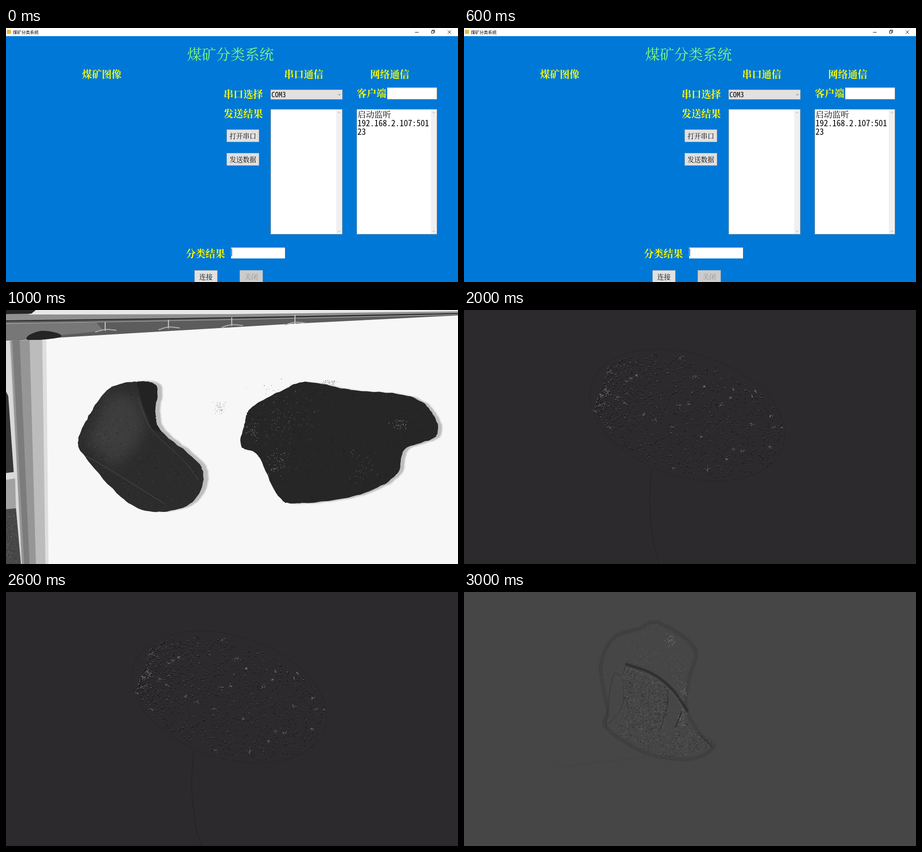
Recreate the animation shown at these times as an HTML page with a canvas. Size 998 px wide and 561 px high, loop 4 s.

```html
<!DOCTYPE html>
<html lang="zh">
<head>
<meta charset="utf-8">
<style>
html, body { margin: 0; width: 100%; height: 100%; overflow: hidden; background: #0078d7; }
canvas { display: block; width: 998px; height: 561px; }
</style>
</head>
<body>
<canvas id="stage" width="998" height="561"></canvas>
<script>
const W = 998, H = 561, HOLD = 1000;
const SERIF = '"Noto Serif CJK SC", "Noto Sans CJK SC", serif';
const SANS = '"Noto Sans CJK SC", sans-serif';
const MONO = '"Noto Sans Mono CJK SC", "Noto Sans CJK SC", monospace';
let g, rnd;

function seeded(seed) {
  return () => {
    seed = (seed + 0x6D2B79F5) | 0;
    let t = Math.imul(seed ^ (seed >>> 15), 1 | seed);
    t = (t + Math.imul(t ^ (t >>> 7), 61 | t)) ^ t;
    return ((t ^ (t >>> 14)) >>> 0) / 4294967296;
  };
}

const grey = (v, a = 1) => `rgba(${v},${v},${v},${a})`;
const between = (lo, hi) => lo + (hi - lo) * rnd();
const bell = () => rnd() + rnd() + rnd() - 1.5;

function rect(x, y, w, h, fill, edge) {
  g.fillStyle = fill;
  g.fillRect(x, y, w, h);
  if (edge) {
    g.strokeStyle = edge;
    g.lineWidth = 1;
    g.strokeRect(x + 0.5, y + 0.5, w - 1, h - 1);
  }
}

function text(s, x, y, size, color, family = SERIF, weight = 400) {
  g.font = `${weight} ${size}px ${family}`;
  g.fillStyle = color;
  g.textBaseline = 'middle';
  g.fillText(s, x, y);
}

function poly(p, color) {
  g.fillStyle = color;
  g.beginPath();
  for (let i = 0; i < p.length; i += 2) g.lineTo(p[i], p[i + 1]);
  g.fill();
}

// Catmull-Rom curve through a few x,y pairs; rough makes the edge ragged.
function curve(p, closed = true, rough = 0) {
  const path = new Path2D(), n = p.length / 2;
  const at = (i, k) => p[2 * (closed ? (i + n) % n : Math.min(n - 1, Math.max(0, i))) + k];
  const spline = (i, k, t) => {
    const [a, b, c, d] = [-1, 0, 1, 2].map(o => at(i + o, k));
    return b + t / 2 * (c - a + t * (2 * a - 5 * b + 4 * c - d + t * (3 * (b - c) + d - a)));
  };
  for (let i = 0; i < (closed ? n : n - 1); i++)
    for (let t = 0; t < 1; t += 0.1)
      path.lineTo(spline(i, 0, t) + between(-rough, rough), spline(i, 1, t) + between(-rough, rough));
  if (closed) path.closePath();
  else path.lineTo(at(n - 1, 0), at(n - 1, 1));
  return path;
}

function stroke(path, color, width = 1) {
  g.strokeStyle = color;
  g.lineWidth = width;
  g.stroke(path);
}

const line = (p, color, width = 1) => stroke(curve(p, false), color, width);

function blurred(px, draw) {
  g.save();
  g.filter = `blur(${px}px)`;
  draw();
  g.restore();
}

function inside(path, draw) {
  g.save();
  g.clip(path);
  draw();
  g.restore();
}

function dot(x, y, color, size) {
  g.fillStyle = color;
  g.fillRect(x, y, size * between(0.6, 1.2), size * between(0.6, 1.2));
}

function grain(n, x, y, w, h, lo, hi, alpha, size = 2) {
  for (let i = 0; i < n; i++)
    dot(x + rnd() * w, y + rnd() * h, grey(between(lo, hi), alpha), size);
}

function cluster(n, x, y, rx, ry, lo, hi, alpha, size = 1.6) {
  for (let i = 0; i < n; i++)
    dot(x + bell() * rx, y + bell() * ry, grey(between(lo, hi), alpha), size);
}

function chevron(x, y, dir, color = '#9a9a9a') {
  line([x - 2.5, y - dir * 1.3, x, y + dir * 1.3, x + 2.5, y - dir * 1.3], color);
}

function button(s, x, y, w, off) {
  rect(x, y, w, 28, off ? '#ccc' : '#e1e1e1', off ? '#bfbfbf' : '#adadad');
  text(s, x + (w - s.length * 14.7) / 2, y + 14, 14.7, off ? '#8f8f8f' : '#000');
}

function listBox(x, w) {
  rect(x, 179, w, 277, '#fff', '#8a8f96');
  rect(x + w - 14, 180, 13, 275, '#f0f0f0');
  chevron(x + w - 7.5, 187, -1);
  chevron(x + w - 7.5, 449, 1);
}

function titleBar() {
  rect(0, 0, W, 18, '#fff');
  rect(2, 4, 9, 9, '#e8b83a');
  text('煤矿分类系统', 15, 9.5, 9.5, '#000', SANS);
  rect(903, 9, 8, 1, '#111');
  rect(941, 4, 6, 6, '#fff', '#111');
  rect(939, 6, 6, 6, '#fff', '#111');
  line([975, 5, 983, 13], '#111');
  line([983, 5, 975, 13], '#111');
}

function form() {
  rect(0, 0, W, H, '#0078d7');
  titleBar();
  text('煤矿分类系统', 400, 58, 31.9, '#80ff80');
  const label = (s, x, y) => text(s, x, y, 21.7, '#ffff00', SERIF, 700);
  label('煤矿图像', 168, 101.5);
  label('串口通信', 614, 101.5);
  label('网络通信', 804, 101.5);
  label('串口选择', 480.5, 146);
  label('发送结果', 480.5, 189);
  label('客户端', 774.5, 143.5);
  label('分类结果', 397, 497.5);

  rect(584, 136, 159, 22, '#e1e1e1', '#adadad');
  text('COM3', 586, 147, 16, '#000', MONO);
  chevron(736, 147, 1, '#444');
  rect(841, 131, 111, 27, '#fff', '#8a8f96');
  listBox(584, 159);
  listBox(774, 178);
  ['启动监听', '192.168.2.107:501', '23'].forEach((s, i) =>
    text(s, 776, 190.5 + i * 19.3, 18.6, '#000', i ? MONO : SERIF));

  button('打开串口', 487, 224, 72);
  button('发送数据', 487, 276, 72);
  rect(496, 484, 121, 26, '#fff', '#0078d7');
  rect(498, 487, 1, 17, '#000');
  button('连接', 416, 535, 51);
  button('关闭', 516, 535, 51, true);
}

function rail() {
  poly([0, 0, W, 0, W, 12, 640, 30, 300, 50, 0, 68], '#5c5c5c');
  poly([0, 0, W, 0, W, 7, 500, 16, 0, 25], '#909090');
  poly([62, 0, W, 0, W, 3, 500, 9, 50, 10], '#e8e8e8');
  poly([0, 0, 66, 0, 56, 8, 0, 9], '#252525');
  poly([0, 28, 200, 28, 215, 46, 0, 68], '#777');
  line([0, 24, 500, 17, W, 8], '#252525', 2);
  line([0, 30, 500, 21, W, 10], '#a0a0a0', 1.5);
  for (let i = 0; i < 4; i++) {
    const x = 219 + i * 139.7, y = 36 - i * 5.3;
    line([x, y - 9, x, y + 10], '#d0d0d0', 2);
    line([x - 22, y + 13, x, y + 7, x + 25, y + 9], '#b4b4b4', 2);
  }
  g.fillStyle = '#242424';
  g.fill(curve([50, 56, 80, 46, 116, 52, 116, 61, 52, 67]));
}

function pillar() {
  poly([0, 70, 12, 68, 36, H, 0, H], '#d9d9d9');
  poly([0, 180, 5, 190, 17, 358, 0, 360], '#363636');
  poly([0, 375, 20, 372, 22, 440, 0, 440], '#a2a2a2');
  poly([0, 440, 22, 438, 33, H, 0, H], '#484848');
  grain(200, 0, 445, 24, 116, 30, 130, 0.6);
  const band = (a, b, c, d, v) => poly([a, 67, b, 66, d, H, c, H], grey(v));
  band(8, 89, 35, 94, 222);
  band(8, 80, 35, 87, 188);
  band(10, 52, 35, 66, 150);
  band(14, 30, 40, 52, 124);
}

// Ragged dark stone with its cast shadow to the right.
function stone(points, tone, shift, drop) {
  const path = curve(points, true, 1);
  blurred(1.5, () => {
    g.save();
    g.translate(shift, drop);
    g.fillStyle = '#bdbdbd';
    g.fill(path);
    g.restore();
  });
  g.fillStyle = grey(tone);
  g.fill(path);
  return path;
}

function samples() {
  rect(0, 0, W, H, '#f7f7f7');
  rail();
  pillar();

  const left = stone([232, 171, 295, 158, 333, 170, 330, 230, 345, 270, 432, 349, 412, 424,
    330, 446, 262, 420, 175, 325, 160, 285, 190, 222], 44, 11, -1);
  inside(left, () => {
    blurred(14, () => poly([225, 185, 285, 190, 310, 250, 290, 300, 240, 345, 180, 290], '#3d3d3d'));
    grain(1500, 159, 160, 275, 286, 15, 85, 0.4);
    cluster(260, 215, 285, 45, 70, 70, 120, 0.4);
    poly([285, 150, 345, 160, 330, 232, 344, 270, 322, 264, 303, 215], '#232323');
    line([290, 192, 322, 264, 390, 330, 425, 375], '#505050');
    line([175, 322, 225, 350, 350, 428], '#555');
  });

  const right = stone([541, 216, 600, 182, 662, 159, 760, 176, 885, 189, 940, 225, 950, 278,
    880, 308, 862, 364, 780, 408, 645, 427, 600, 410, 557, 322, 519, 300, 528, 248], 38, 9, 1);
  inside(right, () => {
    grain(1500, 518, 160, 436, 268, 10, 65, 0.4);
    cluster(130, 610, 240, 75, 65, 80, 170, 0.6);
    cluster(55, 600, 335, 32, 32, 100, 210, 0.7);
    cluster(35, 543, 265, 17, 30, 120, 220, 0.7);
    cluster(32, 866, 252, 17, 14, 110, 230, 0.7);
    cluster(45, 785, 345, 32, 40, 80, 160, 0.6);
  });
  cluster(70, 471, 215, 12, 14, 130, 200, 0.6);
  cluster(35, 714, 159, 18, 6, 70, 150, 0.7);
  cluster(18, 590, 175, 60, 22, 90, 160, 0.7);
}

// Grains over a tilted ellipse, denser and brighter towards its left end.
function brightGrains() {
  rect(0, 0, W, H, '#2c2a2d');
  const a = 222, b = 135;
  g.save();
  g.translate(493, 232);
  g.rotate(0.318);
  g.beginPath();
  g.ellipse(0, 0, a, b, 0, 0, 7);
  g.strokeStyle = grey(22, 0.3);
  g.stroke();
  for (let i = 0; i < 1500; i++) {
    const u = rnd() ** 1.5, side = 1 - u;
    const x = a * (1.84 * u - 0.9);
    const y = between(-0.92, 0.92) * b * Math.sqrt(1 - (x / a) ** 2);
    dot(x + 1, y + 1.5, grey(12, 0.5), 2.2);
    dot(x, y, grey(60 + 150 * rnd() ** 4, 0.3 + 0.4 * side), 1.6);
    if (i % 40 === 0) cluster(9, x, y, 5, 3.5, 80, 190, 0.6, 1.7);
  }
  g.restore();
  line([414, 352, 410, 430, 418, 510, 431, H], grey(20, 0.55));
}

function edges() {
  rect(0, 0, W, H, '#454645');
  const rim = curve([302, 165, 330, 102, 385, 82, 430, 68, 509, 124, 497, 190, 490, 255,
    520, 312, 552, 340, 500, 369, 400, 355, 313, 298, 317, 262], true, 0.6);
  const seam = [357, 159, 415, 180, 460, 215, 494, 264];
  const facet = (points, n, x, y, w, h) => inside(curve(points), () => {
    grain(n, x, y, w, h, 25, 55, 0.45);
    grain(n, x, y, w, h, 90, 155, 0.42, 1.6);
  });

  blurred(2, () => stroke(rim, grey(40, 0.7), 3));
  stroke(rim, grey(100, 0.35));
  inside(rim, () => {
    grain(1400, 300, 68, 255, 305, 40, 115, 0.3);
    cluster(120, 400, 140, 35, 25, 40, 135, 0.4);
    cluster(160, 470, 175, 28, 55, 35, 140, 0.4);
  });
  facet([357, 170, 400, 182, 450, 215, 435, 303, 352, 285], 800, 348, 168, 104, 140);
  facet([483, 265, 500, 298, 550, 335, 465, 363, 465, 305], 420, 460, 263, 92, 104);
  facet([314, 293, 380, 298, 455, 318, 465, 367, 390, 345], 320, 312, 290, 155, 80);

  blurred(1, () => line(seam, '#2c2c2c', 5));
  g.save();
  g.translate(-1, 8);
  line(seam, grey(115, 0.5));
  g.restore();
  line([358, 157, 349, 183, 328, 188, 313, 298], grey(38, 0.6));
  line([350, 190, 350, 250, 318, 292], grey(38, 0.6));
  line([450, 215, 448, 255, 433, 303], grey(38, 0.6), 1.5);
  line([481, 263, 467, 299], grey(32, 0.8), 2);
  line([522, 316, 532, 327, 549, 343], grey(38, 0.7), 2);
  cluster(45, 455, 107, 14, 14, 100, 190, 0.6);
  cluster(50, 480, 280, 10, 20, 100, 190, 0.6);
  cluster(40, 484, 220, 10, 22, 100, 190, 0.6);
  line([200, 389, 290, 377, 400, 365], grey(54, 0.35));
}

const scenes = [form, samples, brightGrains, edges].map((draw, i) => {
  const c = document.createElement('canvas');
  c.width = W;
  c.height = H;
  g = c.getContext('2d');
  rnd = seeded(17 + i * 31);
  draw();
  return c;
});

const ctx = document.getElementById('stage').getContext('2d');
const start = performance.now();

function show() {
  const t = Math.max(0, performance.now() - start);
  ctx.drawImage(scenes[Math.floor(t / HOLD) % scenes.length], 0, 0);
  requestAnimationFrame(show);
}
show();
</script>
</body>
</html>
```
